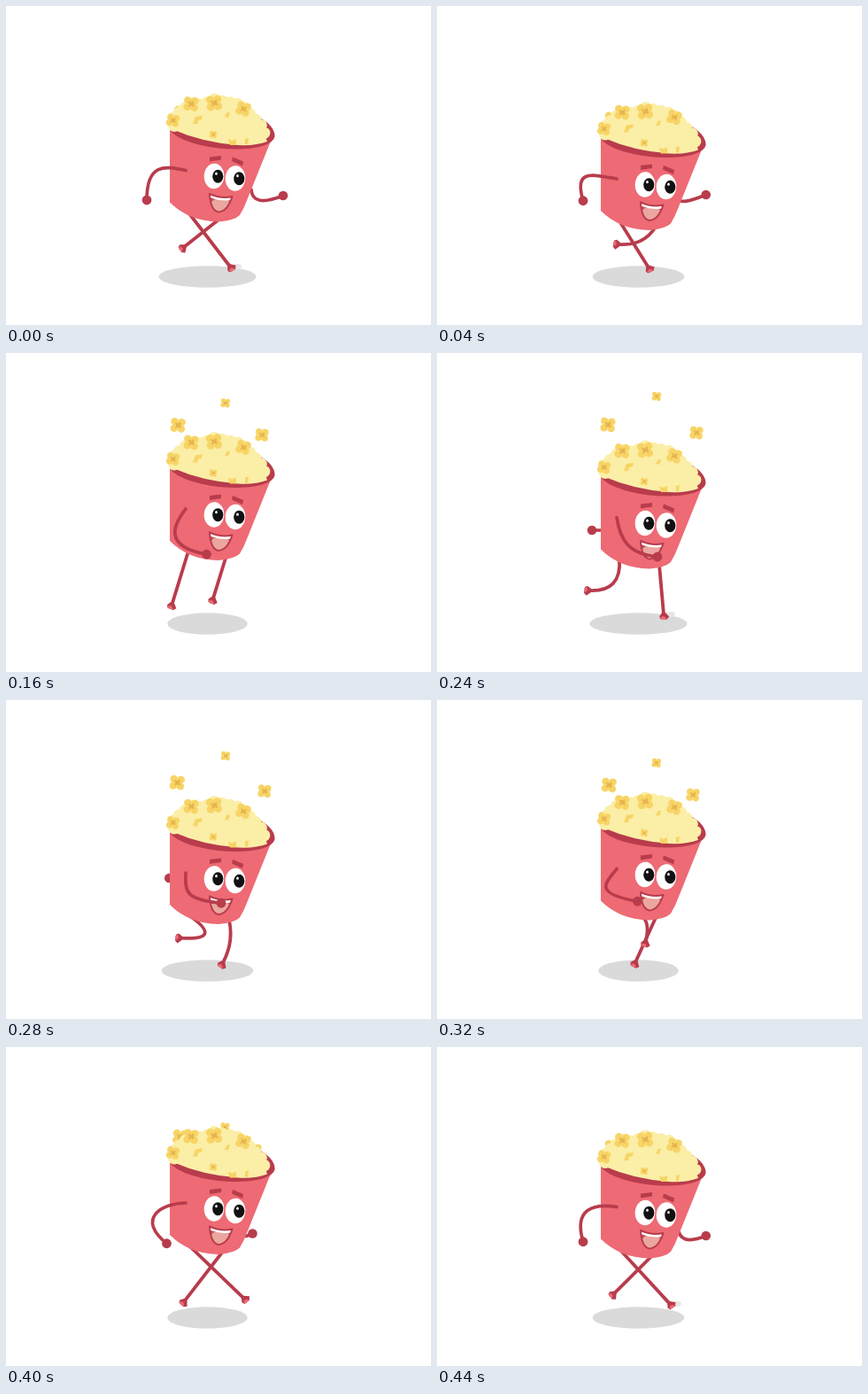
An HTML page with a canvas for the animation above (0.48 s loop, 480 px wide and 360 px high).

```html
<!DOCTYPE html>
<html lang="en">
<head>
<meta charset="utf-8">
<title>Running popcorn bucket</title>
<style>
html, body { margin: 0; width: 100%; height: 100%; overflow: hidden; background: #fff; }
canvas { display: block; width: 480px; height: 360px; }
</style>
</head>
<body>
<canvas id="stage" width="480" height="360"></canvas>
<script>
const ctx = document.getElementById('stage').getContext('2d');
const STEP = 40, COUNT = 12;
const RED = '#ee6a74', DARK = '#b83c4c', CREAM = '#fbeea6', GOLD = '#f7d465', AMBER = '#e6b44e';

// Foot positions at each quarter of the stride.
const legs = [
  { hip: 250.5, x: [201, 220, 256, 208], y: [272, 270, 295, 293] },
  { hip: 206, x: [253, 204, 172, 263], y: [294, 291, 268, 278] }
];
const tossed = [
  { x: 195.5, y: 101, rise: 20, drift: -2.5, size: 1 },
  { x: 247.5, y: 83, rise: 34, drift: .5, size: .62 },
  { x: 285, y: 114, rise: 24, drift: 8, size: .88 }
];

// Smooth closed curve through evenly spaced keys, u in 0..1.
function follow(keys, u) {
  const n = keys.length, i = Math.floor(u * n), f = u * n - i;
  const [a, b, c, d] = [-1, 0, 1, 2].map(k => keys[(i + k + n) % n]);
  return b + f / 2 * (c - a + f * (2 * a - 5 * b + 4 * c - d + f * (3 * (b - c) + d - a)));
}

function oval(x, y, rx, ry, color, turn = 0) {
  ctx.fillStyle = color;
  ctx.beginPath();
  ctx.ellipse(x, y, rx, ry, turn, 0, Math.PI * 2);
  ctx.fill();
}
function fill(path, color) {
  ctx.fillStyle = color;
  ctx.fill(new Path2D(path));
}
function stroke(path, width, color = DARK) {
  ctx.strokeStyle = color;
  ctx.lineWidth = width;
  ctx.stroke(new Path2D(path));
}

function kernel(x, y, size, turn = .1) {
  ctx.save();
  ctx.translate(x, y);
  ctx.rotate(turn);
  ctx.scale(size, size);
  for (const sx of [-1, 1]) for (const sy of [-1, 1]) oval(sx * 4, sy * 3.8, 4.3, 4.2, GOLD);
  oval(0, 0, 4.8, 4.8, GOLD);
  fill('M-4-3 L0-2 L3-4 L3 0 L4 3 L0 2 L-3 4 L-2 0Z', AMBER);
  ctx.restore();
}

// The knee bends forward when the foot comes close to the hip.
function leg({ hip, x, y }, u, bob) {
  const hipY = 233 + bob, footX = follow(x, u), footY = follow(y, u);
  const dx = footX - hip, dy = footY - hipY, reach = Math.hypot(dx, dy);
  const bend = Math.sqrt(Math.max(0, 56 * 56 - reach * reach)) / reach;
  const kneeX = hip + dx / 2 + dy * bend, kneeY = hipY + dy / 2 - dx * bend;
  stroke(`M${hip} ${hipY} Q${kneeX} ${kneeY} ${footX} ${footY}`, 3.8);
  if (footX > 250 && footY > 286) oval(footX + 8, footY, 5, 3.2, '#e9e5e6');
  ctx.save();
  ctx.translate(footX, footY);
  ctx.rotate(Math.atan2(footY - kneeY, footX - kneeX));
  fill('M-2-2 L3-6 L6-3 L5 4 L2 5 L-2 2Z', DARK);
  fill('M2 0 L5-3 L6 2 L3 4Z', RED);
  ctx.restore();
}

// Arms swing with s from 1 to -1.
function backArm(s, bob) {
  const handX = 244 + 69 * s, handY = 207 + 7 * s;
  stroke(`M${238 + 39 * s} ${203 + 4 * s + bob} Q${238 + 40 * s} ${214 + 14 * s} ${handX} ${handY}`, 3.7);
  oval(handX, handY, 5.3, 5.3, DARK);
}
function frontArm(s, bob) {
  const q = s * s, handX = 204 - 45 * s, handY = 224.5 - 5.5 * s;
  stroke(`M203 ${185.5 + bob}
    C${180 - 14.5 * s + 12.5 * q} ${193 - 16 * s + 3 * q + bob}
    ${152 - 29 * s + 36 * q} ${207 - 24.5 * s - 4.5 * q} ${handX} ${handY}`, 3.7);
  oval(handX, handY, 5.4, 5.4, DARK);
}

function bucket() {
  fill('M185 128 V221.5 C198 235 217 243 240 243.5 Q258 242 264 236 Q269 228 273 217 L300 150 L250 130Z', RED);
  const rim = 'M192 120 C184 125 184 137 189 142 C203 154 238 161 267 159.5 C291 158.5 304 152 301.5 144 C299 136 290 129 279 125Z';
  fill(rim, DARK);
  stroke(rim, 3.6);
}

function heap() {
  const crest = 'M190 135 L188 128 L200 117 L209 110 L222 112 L235 105.5 L266 112 L277 124 L288 135 L293 147';
  fill(crest + ' L295 153 Q282 158 262 157 Q222 154 190 140Z', CREAM);
  ctx.setLineDash([0, 9]);
  stroke(crest, 14, CREAM);
  ctx.setLineDash([]);
  kernel(209, 110.5, 1);
  kernel(235, 109.5, 1.05, -.1);
  kernel(268, 116, .95, .3);
  kernel(188.5, 129, .85, .2);
  kernel(234, 145, .5);
  fill('M211 133 L214 125 L222 124 L221 128 L217 129 L216 133Z', GOLD);
  fill('M247 125 L250 120 L253 120 L251 126Z', GOLD);
  fill('M251 150 L255 152 L260 150 L260 157 L253 157Z', GOLD);
  fill('M270 150 L274 149 L273 156 L270 156Z', GOLD);
}

function eye(x, y) {
  oval(x, y, 11.3, 14.2, '#fff', .05);
  oval(x + 4.3, y + .2, 6.1, 7.5, '#111');
  oval(x + 2.5, y - 2.8, 1.3, 1.6, '#fff');
}

function face() {
  fill('M230 170.5 L243 169 L243 173.5 L230 175.5Z', DARK);
  fill('M256 170.5 L268 175.5 L267 180.5 L255 175Z', DARK);
  eye(235, 192);
  eye(259, 194.5);

  const mouth = 'M230 212 Q243 218 255.5 215 Q250 232 240 232.5 Q231 231 230 212Z';
  ctx.save();
  ctx.clip(new Path2D(mouth));
  fill(mouth, '#c24a56');
  oval(241, 226, 12, 9, '#eba69f', -.2);
  fill('M228 210 Q243 218 258 214 L255 219 Q243 221 230 216Z', '#fff');
  ctx.restore();
  stroke(mouth, 2);
}

function render(now) {
  const u = Math.floor(now / STEP) % COUNT / COUNT;
  const phase = u * Math.PI * 2, swing = Math.cos(phase);
  const bob = Math.sin(2 * phase) * (8.4 + 3 * Math.sin(4 * phase));
  ctx.clearRect(0, 0, 480, 360);
  ctx.lineCap = ctx.lineJoin = 'round';

  oval(227.5, 305.5, 48.5 + 6.5 * Math.cos(2 * phase), 12.2, '#dadada');
  backArm(swing, bob);
  for (const limb of legs) leg(limb, u, bob);

  ctx.save();
  ctx.translate(0, bob);
  bucket();
  for (const { x, y, rise, drift, size } of tossed) kernel(x - drift * swing, y + rise * swing, size);
  heap();
  face();
  ctx.restore();
  frontArm(swing, bob);
}

const begin = performance.now();
function tick() {
  render(performance.now() - begin);
  requestAnimationFrame(tick);
}
tick();
</script>
</body>
</html>
```
